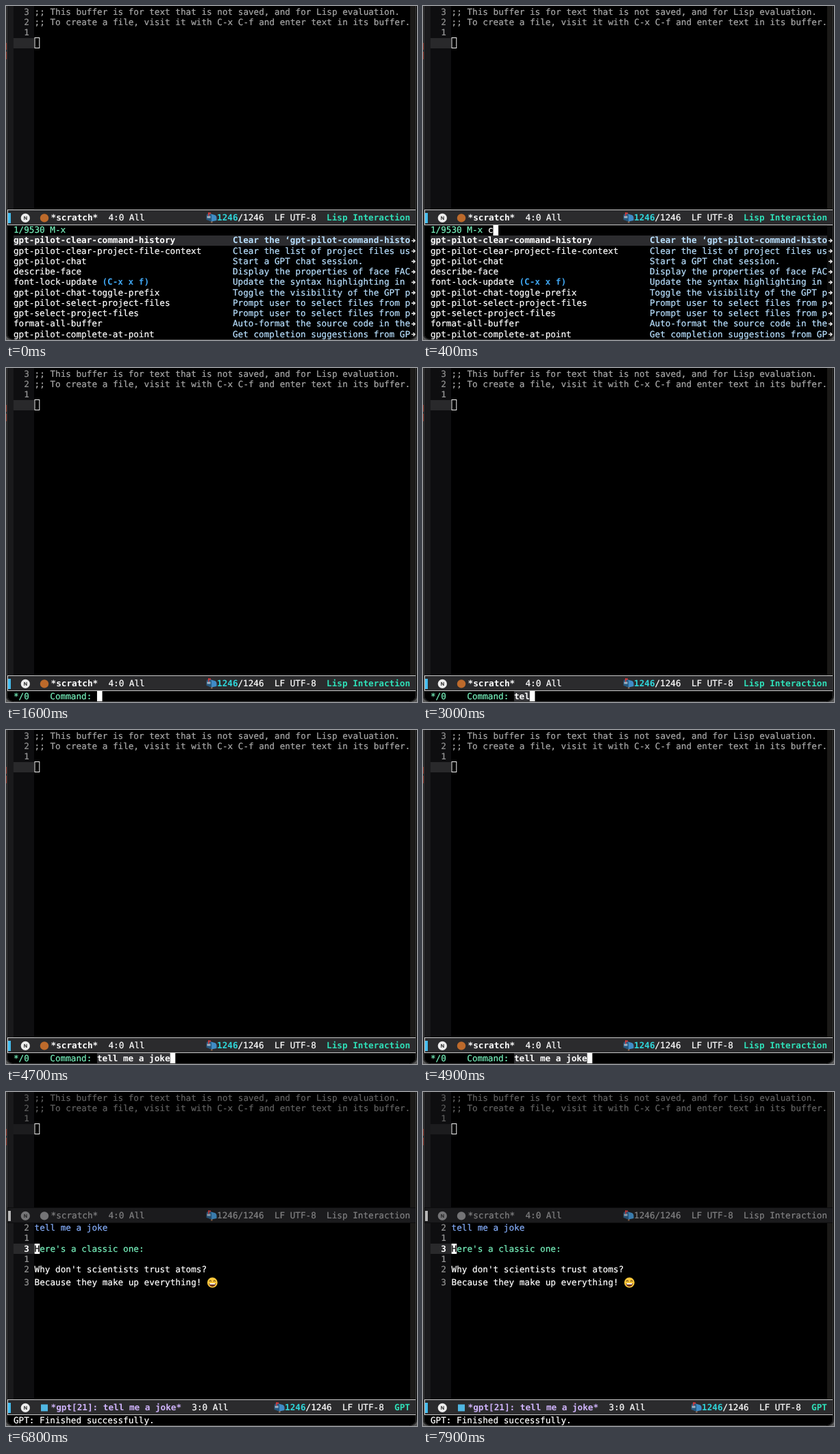
Write an HTML page that moves like this. It is 600 px wide and 489 px high and loops after 8 s.

```html
<!DOCTYPE html>
<html lang="en">
<head>
<meta charset="utf-8">
<title>Editor session</title>
<style>
  html, body { margin: 0; width: 100%; height: 100%; overflow: hidden; background: #000; }
  svg { display: block; width: 600px; height: 489px; }
  text {
    font: 12.66px "DejaVu Sans Mono", "Liberation Mono", monospace;
    white-space: pre;
    text-rendering: geometricPrecision;
    stroke-width: 0.22px;
  }
  .b { font-weight: bold; stroke-width: 0; }
</style>
</head>
<body>
<svg id="stage" viewBox="0 0 600 489"></svg>
<script>
const LOOP = 8000, CW = 7.62, LH = 15.23, BASE = 11.8, LEFT = 11, BODY = 41.6;
const C = {
  fg: '#ffffff', comment: '#a8a8a8', dim: '#606060', num: '#929292', numDim: '#5a5a5a',
  green: '#76efbb', teal: '#2fdfb8', cyan: '#2fd6da', blue: '#3fa6f2', doc: '#b8e0ff',
  match: '#f9a6ec', head: '#84acf8', title: '#d0b4fd', bar: '#2b2b2d', sel: '#2c2c2f'
};

const FIRST = [
  ['gpt-pilot-clear-command-history', '', 'Clear the ‘gpt-pilot-command-histo'],
  ['gpt-pilot-clear-project-file-context', '', 'Clear the list of project files us'],
  ['gpt-pilot-chat', '', 'Start a GPT chat session.'],
  ['describe-face', '', 'Display the properties of face FAC'],
  ['font-lock-update', '(C-x x f)', 'Update the syntax highlighting in'],
  ['gpt-pilot-chat-toggle-prefix', '', 'Toggle the visibility of the GPT p'],
  ['gpt-pilot-select-project-files', '', 'Prompt user to select files from p'],
  ['gpt-select-project-files', '', 'Prompt user to select files from p'],
  ['format-all-buffer', '', 'Auto-format the source code in the'],
  ['gpt-pilot-complete-at-point', '', 'Get completion suggestions from GP']
];
const FILTERED = [
  ['gpt-pilot-chat', '', 'Start a GPT chat session.'],
  ['gpt-pilot-chat-toggle-prefix', '', 'Toggle the visibility of the GPT p'],
  ['gpt-pilot-chat-follow-up', '', 'Run a follow-up GPT command on the'],
  ['goto-char', '(M-g c)', 'Set point to POSITION, a number or'],
  ['left-char', '', 'Move point N characters to the lef'],
  ['right-char', '', 'Move point N characters to the rig'],
  ['delete-char', '', 'Delete the following N characters'],
  ['evil-change', '(c)', 'Change text from BEG to END with T'],
  ['insert-char', '(C-x 8 RET)', 'Insert COUNT copies of CHARACTER.'],
  ['upcase-char', '', 'Uppercasify ARG chars starting fro']
];

// Key press times and reply chunks
const SEARCH = 'cha', SEARCH_AT = [400, 500, 600];
const ASK = 'tell me a joke';
const ASK_AT = [2600, 2800, 3000, 3100, 3250, 3400, 3550, 3700, 3850, 4000, 4150, 4300, 4450, 4550];
const COMMAND_AT = 1300, CHAT_AT = 5000, DONE_AT = 6500;
const REPLY = [
  [5700, 0, 'Here'], [5800, 0, "Here's a"], [5900, 0, "Here's a classic one:"],
  [6000, 1, 'Why'], [6100, 1, "Why don't scientists"], [6200, 1, "Why don't scientists trust atoms?"],
  [6300, 2, 'Because they'], [6400, 2, 'Because they make up everything!']
];

const stage = document.getElementById('stage');
const esc = s => s.replace(/&/g, '&amp;').replace(/</g, '&lt;');
const rect = (x, y, w, h, fill, extra = '') =>
  `<rect x="${x}" y="${y}" width="${w}" height="${h}" fill="${fill}" ${extra}/>`;
const dot = (x, y, r, fill) => `<circle cx="${x}" cy="${y}" r="${r}" fill="${fill}"/>`;
const line = (d, color, w = 1) => `<path d="${d}" fill="none" stroke="${color}" stroke-width="${w}"/>`;
// Text placed by the top of its row
const put = (x, y, s, fill, bold) =>
  `<text x="${x.toFixed(1)}" y="${(y + BASE).toFixed(1)}" fill="${fill}" stroke="${fill}"` +
  `${bold ? ' class="b"' : ''}>${esc(s)}</text>`;
const col = n => LEFT + n * CW;
const typed = (s, times, t) => s.slice(0, times.filter(k => k <= t).length);

function pane(top, bottom) {
  const h = bottom - top;
  return rect(2, top, 9, h, '#1a1a1c') + rect(11, top, 30, h, '#0e0e10') +
    rect(590, top, 8, h, '#1b1a18');
}

function scratch(bottom, dim) {
  const ink = dim ? C.dim : C.comment, num = dim ? C.numDim : C.num;
  return pane(0, bottom) +
    put(col(2), 0.8, '3', num) + put(BODY, 0.8, ';; This buffer is for text that is not saved, and for Lisp evaluation.', ink) +
    put(col(2), 16, '2', num) + put(BODY, 16, ';; To create a file, visit it with C-x C-f and enter text in its buffer.', ink) +
    put(col(2), 31.2, '1', num) +
    rect(11, 47, 30, 15, dim ? '#1c1c1e' : '#29292b') +
    rect(42, 46.5, 6.8, 15, 'none', 'stroke="#f4f4f4"');
}

function mailbox(x, y, dim) {
  return `<g transform="translate(${x} ${y})" opacity="${dim ? 0.85 : 1}">` +
    rect(7, 10, 2.5, 5, '#8a6248') +
    '<path d="M3 11V5a4 4 0 0 1 3-3.500L11 3a5 5 0 0 1 4.500 5v3.500L8 13Z" fill="#3f8cc6"/>' +
    '<path d="M0.500 10.500V5a3.500 3.500 0 0 1 7.500 0V13Z" fill="#27597f"/>' +
    rect(1.5, 5, 5, 3, '#9fb4c4') + rect(3, 0, 1.5, 5, '#d83a3a') + rect(3, 0, 4, 2, '#d83a3a') + '</g>';
}

function modeline(y, o) {
  const dim = o.dim, ink = dim ? '#808082' : C.fg, mid = y + 12.4, row = y + 4.6;
  const mode = 590 - o.mode.length * CW, coding = mode - 10 * CW, mail = coding - 11 * CW;
  const edge = dim ? '' : 'stroke="#c9c9c9"';
  return rect(2.5, y + 0.5, 596, 22, dim ? '#1b1b1d' : C.bar, edge) +
    rect(3, y + 5, 4, 15, dim ? '#b8b8b8' : '#45bdee') +
    dot(28.3, mid, 6.6, dim ? '#747476' : '#ececec') +
    `<text x="28.3" y="${mid + 2.6}" text-anchor="middle" fill="#222" style="font:bold 7px Inter,sans-serif">N</text>` +
    (o.square ? rect(51, mid - 5, 10, 10, '#4fb6e2') : dot(56, mid, 6.2, dim ? '#747476' : '#bd6a2b')) +
    put(65.6, row, o.name, dim ? ink : o.color, !dim) +
    put(65.6 + (o.name.length + 2) * CW, row, o.pos + ' All', ink) +
    mailbox(mail - 16, y + 4.5, dim) +
    put(mail, row, '1246', dim ? ink : C.cyan, !dim) + put(mail + 4 * CW, row, '/1246', ink) +
    put(coding, row, 'LF UTF-8', ink) + put(mode, row, o.mode, dim ? ink : C.teal, !dim);
}

const scratchBar = (y, dim) =>
  modeline(y, { name: '*scratch*', color: C.fg, pos: '4:0', mode: 'Lisp Interaction', dim });

const arrow = y => line(`M592 ${y}h5M594.5 ${y - 2.5}l2.5 2.5l-2.5 2.5`, '#f0f0f0', 1.4);

function candidate([name, key, doc], i, query) {
  const y = 335.6 + i * LH, bold = i === 0;
  const at = query ? name.indexOf(query) : -1;
  let s = bold ? rect(11, 336, 579, 15, C.sel) : '';
  if (at < 0) s += put(LEFT, y, name, C.fg, bold);
  else {
    const end = at + query.length;
    s += put(LEFT, y, name.slice(0, at), C.fg, bold) + put(col(at), y, query, C.match, true) +
      put(col(end), y, name.slice(end), C.fg, bold);
  }
  if (key) s += put(col(name.length + 1), y, key, C.blue, true);
  return s + put(col(42), y, doc, C.doc, bold) + arrow(y + 8);
}

function picker(t) {
  const q = typed(SEARCH, SEARCH_AT, t), full = q === SEARCH;
  return scratch(298) + scratchBar(298) + rect(590, 321, 8, 168, '#0c0c0c') +
    put(LEFT, 320.6, (full ? '1/454  ' : '1/9530 ') + 'M-x', C.green) +
    put(col(11), 320.6, q, C.fg) +
    (q ? rect(col(11 + q.length), 321, CW, 15, '#fff') : '') +
    (full ? FILTERED : FIRST).map((r, i) => candidate(r, i, full ? q : '')).join('');
}

function command(t) {
  const q = typed(ASK, ASK_AT, t), y = 472.8;
  return scratch(450) + scratchBar(450) +
    put(LEFT, y, '*/0    Command:', C.green) +
    rect(col(16), 473, q.length * CW, 15, '#343437') + put(col(16), y, q, C.fg, true) +
    rect(col(16 + q.length), 473, CW, 15, '#fff');
}

function grin(x, y) {
  return dot(x, y, 7.5, '#fbc73b') +
    line(`M${x - 4.5} ${y - 1.5}q1.5 -3 3 0M${x + 1.5} ${y - 1.5}q1.5 -3 3 0`, '#5d3a16', 1.2) +
    `<path d="M${x - 5} ${y + 1}h10a5 5 0 0 1 -10 0Z" fill="#6b2f1a"/>` +
    rect(x - 4, y + 1, 8, 1.7, '#fff');
}

function chat(t) {
  const said = ['', '', ''], top = 191.3;
  for (const [at, row, s] of REPLY) if (at <= t) said[row] = s;
  const done = t >= DONE_AT, y = n => top + n * LH;
  let s = scratch(169, true) + scratchBar(169, true) + pane(192, 450) +
    put(col(2), y(0), '2', C.num) + put(BODY, y(0), ASK, C.head) +
    put(col(2), y(1), '1', C.num) +
    rect(11, 222, 30, 15, '#29292b') + put(col(2), y(2), '3', C.fg, true) +
    rect(BODY, 222, CW, 15, '#fff') +
    put(BODY, y(2), said[0].slice(0, 1), '#000') + put(BODY + CW, y(2), said[0].slice(1), C.green);
  if (said[1]) s += put(col(2), y(3), '1', C.num) + put(col(2), y(4), '2', C.num) + put(BODY, y(4), said[1], C.fg);
  if (said[2]) {
    const last = y(5) + (done ? 4 : 0);
    s += put(col(2), last, '3', C.num) + put(BODY, last, said[2], C.fg);
  }
  if (done) s += grin(301.3, 279);
  return s +
    modeline(450, { name: '*gpt[21]: tell me a joke*', color: C.title, pos: '3:0', mode: 'GPT', square: true }) +
    put(LEFT, 472.8, done ? 'GPT: Finished successfully.' : 'GPT: Running...', C.fg);
}

// Window edge with rounded lower corners
const FRAME = rect(0, 0, 1, 489, '#222') + rect(0, 54, 1.5, 10, '#8e2f22') + rect(0, 67, 1.5, 11, '#8e2f22') +
  '<path d="M0 479a10 10 0 0 0 10 10H0ZM600 479a10 10 0 0 1 -10 10h10Z" fill="#565656"/>' +
  line('M1.5 0V479a9 9 0 0 0 9 9.5H589.5a9 9 0 0 0 9 -9.5V0', '#3c3c3c');

let shown = '';
function draw(t) {
  const scene = t < COMMAND_AT ? picker : t < CHAT_AT ? command : chat;
  const next = rect(0, 0, 600, 489, '#000') + scene(t) + FRAME;
  if (next !== shown) stage.innerHTML = shown = next;
}

const start = performance.now();
function tick() {
  draw((performance.now() - start) % LOOP);
  requestAnimationFrame(tick);
}
tick();
</script>
</body>
</html>
```
